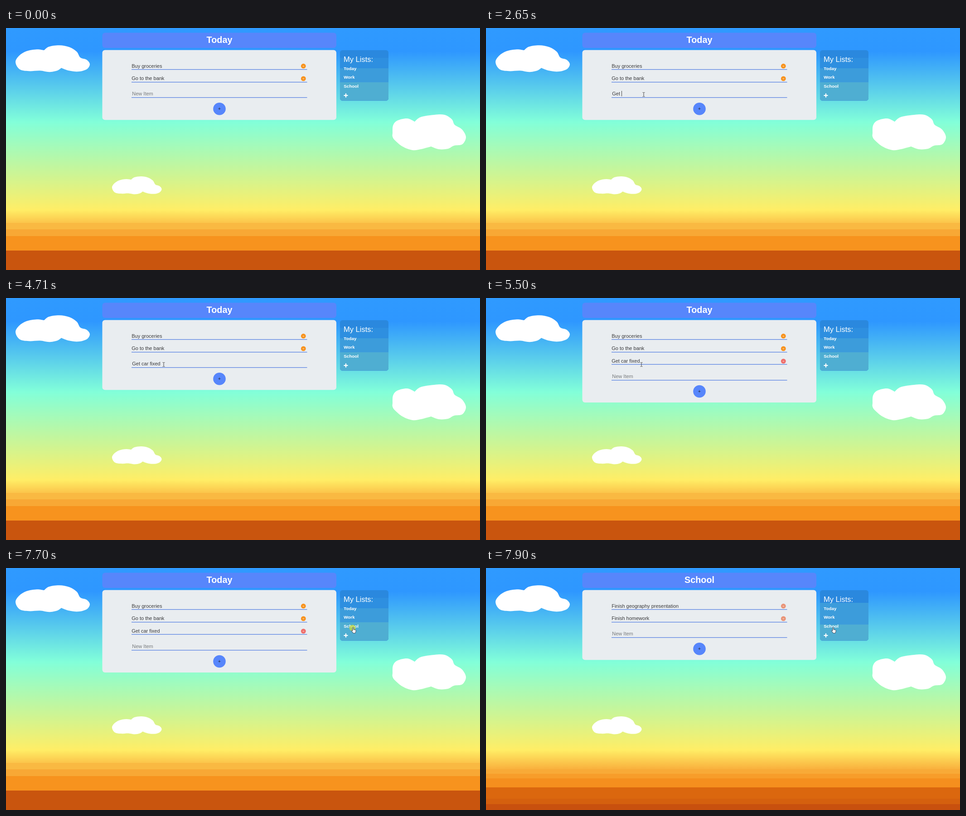
An HTML page with a canvas that plays this animation: 1046 by 535 pixels, repeating every 8 s.

```html
<!DOCTYPE html>
<html lang="en">
<head>
<meta charset="utf-8">
<title>To-do list</title>
<style>
html, body { margin: 0; width: 100%; height: 100%; overflow: hidden; background: #fff; }
canvas { display: block; }
</style>
</head>
<body>
<canvas id="stage" width="1046" height="535"></canvas>
<script>
const ctx = document.getElementById('stage').getContext('2d');
const LOOP = 8000, FRAME = 200 / 3;
const BLUE = '#5786fb', ORANGE = '#f7931e', INK = '#3a3a3c';

// Closed smooth curve through a flat list of points
function blob(flat) {
  const pts = [];
  for (let i = 0; i < flat.length; i += 2) pts.push([flat[i], flat[i + 1]]);
  const n = pts.length, at = i => pts[(i + n) % n], path = new Path2D();
  path.moveTo(...pts[0]);
  for (let i = 0; i < n; i++) {
    const [a, b, c, d] = [at(i - 1), at(i), at(i + 1), at(i + 2)];
    path.bezierCurveTo(b[0] + (c[0] - a[0]) / 6, b[1] + (c[1] - a[1]) / 6,
      c[0] - (d[0] - b[0]) / 6, c[1] - (d[1] - b[1]) / 6, ...c);
  }
  path.closePath();
  return path;
}

const wideCloud = blob([0, 37, 8, 23, 24, 13, 47, 9, 63, 11, 63, 11, 74, 3, 97, 0, 119, 4,
  135, 14, 143, 27, 157, 32, 164, 42, 157, 53, 139, 58, 118, 56, 101, 50, 101, 50, 92, 56,
  74, 59, 54, 56, 29, 57, 9, 53]);
const tallCloud = blob([853, 232, 854, 216, 863, 205, 885, 200, 902, 207, 902, 207, 915, 197,
  945, 192, 968, 192, 984, 202, 990, 214, 1006, 224, 1015, 241, 1007, 257, 989, 260, 975, 267,
  955, 268, 938, 262, 938, 262, 915, 268, 897, 270, 875, 262, 858, 248, 853, 240]);
const hand = new Path2D('M2 8V1.2Q2 0 3 0T4 1.2V5L8 5.8Q9.4 6.2 9.2 7.6L8.6 10.5 7.6 13H3.2L0 8.6Q-.9 7 .4 7Z');
const arrow = new Path2D('M0 0V10L2.3 8 4 11.6 5.6 10.8 4 7.4H7Z');

function text(str, x, y, size, color, weight = '', align = 'left') {
  ctx.font = `${weight} ${size}px "Liberation Sans", Arial, sans-serif`;
  ctx.fillStyle = color;
  ctx.textAlign = align;
  ctx.fillText(str, x, y);
}

function box(x, y, w, h, r, color) {
  ctx.fillStyle = color;
  ctx.beginPath();
  ctx.roundRect(x, y, w, h, r);
  ctx.fill();
}

function disc(x, y, r, color) {
  ctx.fillStyle = color;
  ctx.beginPath();
  ctx.arc(x, y, r, 0, 7);
  ctx.fill();
}

function rect(x, y, w, h, color) {
  ctx.fillStyle = color;
  ctx.fillRect(x, y, w, h);
}

function clouds(color) {
  ctx.fillStyle = color;
  ctx.fill(tallCloud);
  for (const [x, y, s] of [[21, 38.3, 1], [234, 328, .668]]) {
    ctx.save();
    ctx.translate(x, y);
    ctx.scale(s, s);
    ctx.fill(wideCloud);
    ctx.restore();
  }
}

function sky(school) {
  const g = ctx.createLinearGradient(0, 0, 0, 535);
  const stops = [[0, '#2f9aff'], [52, '#2e97ff'], [208, '#82ffd9'], [402, '#ffee66'], [445, '#f9b03d']];
  for (const [y, c] of stops) g.addColorStop(y / 535, c);
  rect(0, 0, 1046, 535, g);
  const bands = school
    ? [[445, '#f8aa37'], [455, '#f79d2a'], [465, '#f58f1e'], [485, '#db670e'], [510, '#d5600e'], [522, '#c8500e']]
    : [[431, '#f9b942'], [445, '#f8a835'], [460, ORANGE], [492, '#c9550e']];
  for (const [y, c] of bands) rect(0, y, 1046, 535 - y, c);
}

function sidebar(school) {
  ctx.save();
  ctx.beginPath();
  ctx.roundRect(737, 49, 107, 111.5, 5.5);
  ctx.clip();
  const tops = school ? [49, 77, 77, 125] : [49, 66, 89, 120];
  ['#2a88de', '#2e8fe0', '#3c9cdb', '#4faed2'].forEach((c, i) => rect(737, tops[i], 107, 112, c));
  ctx.restore();
  text('My Lists:', 745, 74.5, 16.5, '#fff');
  ['Today', 'Work', 'School'].forEach((s, i) => text(s, 745.3, 93 + i * 19.4, 9.8, '#fff', 'bold'));
  rect(745.5, 148, 9, 2.2, '#fff');
  rect(748.9, 144.6, 2.2, 9, '#fff');
}

function list(title, items, dots, draft, caret) {
  const shift = (items.length - 2) * 27.7;
  box(212.5, 10.5, 516.5, 33.5, 6, BLUE);
  text(title, 471, 33.3, 19.8, '#fff', 'bold', 'center');
  box(212.5, 48.8, 516.5, 154.4 + shift, 6, '#e9edf0');
  items.forEach((s, i) => {
    const y = i * 27.7;
    text(s, 277.2, 87.5 + y, 11, INK);
    rect(277, Math.round(91 + y), 387.5, 1.3, '#5983e2');
    disc(656.3, 84.2 + y, 5.4, dots[i]);
    rect(654.7, 83.9 + y, 3.2, 1.1, '#fbe9d8');
  });
  text(draft || 'New Item', 278.3, 148.8 + shift, 11, draft ? INK : '#777a7c');
  if (caret) rect(Math.round(278 + (draft ? ctx.measureText(draft).width : 0)), 139, 1, 12, '#444');
  rect(277, Math.round(153 + shift), 387.5, 1.3, '#5983e2');
  disc(471, 178.8 + shift, 13.8, BLUE);
  text('+', 471, 182.3 + shift, 10, '#222', '', 'center');
}

const KEYS = [2120, 2380, 2450, 2650, 2840, 2970, 3110, 3240, 3440, 3570, 3770, 4040, 4170];
const NEW_ITEM = 'Get car fixed';
const draftAt = t => t < 5500 ? NEW_ITEM.slice(0, KEYS.filter(k => k <= t).length) : '';
const caretAt = t => t >= 1390 && t < 1920 || t >= 2120 && t < 4710 || t >= 5230 && t < 5500;

const bend = (a, b, c, s) => a.map((v, i) => v * (1 - s) ** 2 + 2 * b[i] * s * (1 - s) + c[i] * s * s);
const progress = (t, start, steps) => Math.min(1, Math.floor((t - start) / FRAME) / steps);

function pointer(t) {
  if (t < 590) return null;
  if (t < 1390) {
    const u = progress(t, 590, 12);
    const p = bend([982, 533], [560, 515], [352, 144], 1 - (1 - u ** 1.6) ** 6);
    const inField = p[0] < 664 && p[1] < 153;
    return [inField ? 'beam' : 'arrow', ...p];
  }
  if (t < 1460) return ['beam', 352, 144];
  if (t < 1520) return ['beam', 344, 146];
  if (t < 1580) return ['beam', 346, 147];
  if (t < 4910) return ['beam', 348, 147];
  if (t < 6300) return ['beam', 343, 147];
  if (t < 6840) {
    const u = progress(t + FRAME, 6300, 7);
    return ['arrow', ...bend([343, 147], [600, 288], [745, 165], u * (2 - u))];
  }
  const u = progress(t + FRAME, 6840, 6), s = u * (2 - u);
  const y = 165 - 33 * s - (t >= 7500 ? 1 : 0);
  return [y < 137 ? 'hand' : 'arrow', 745 + 18 * s, y];
}

function drawPointer([kind, x, y]) {
  ctx.save();
  ctx.translate(x, y);
  if (kind === 'beam') {
    rect(-.5, -4.5, 1, 9, '#444');
    rect(-2.5, -5, 2, 1, '#555');
    rect(.5, -5, 2, 1, '#555');
    rect(-2.5, 4, 2, 1, '#555');
    rect(.5, 4, 2, 1, '#555');
  } else {
    const shape = kind === 'hand' ? hand : arrow;
    ctx.fillStyle = '#fff';
    ctx.strokeStyle = '#334';
    ctx.lineWidth = .9;
    ctx.fill(shape);
    ctx.stroke(shape);
  }
  ctx.restore();
}

function draw(t) {
  const school = t >= 7900, blank = t >= 7830 && !school;
  if (blank) {
    rect(0, 0, 1046, 535, '#fefefe');
    clouds('#fcfcfc');
  } else {
    sky(school);
    clouds('#fff');
    sidebar(school);
    if (school) {
      list('School', ['Finish geography presentation', 'Finish homework'], ['#e99478', '#e99478']);
    } else {
      const items = ['Buy groceries', 'Go to the bank'];
      if (t >= 5500) items.push(NEW_ITEM);
      list('Today', items, [ORANGE, ORANGE, '#ef6e6c'], draftAt(t), caretAt(t));
    }
    if (t >= 7700 && !school) disc(764.5, 132.5, 7, 'rgba(205,220,50,.7)');
  }
  const p = pointer(t);
  if (p) drawPointer(p);
}

function tick(now) {
  draw(now % LOOP);
  requestAnimationFrame(tick);
}
requestAnimationFrame(tick);
</script>
</body>
</html>
```
